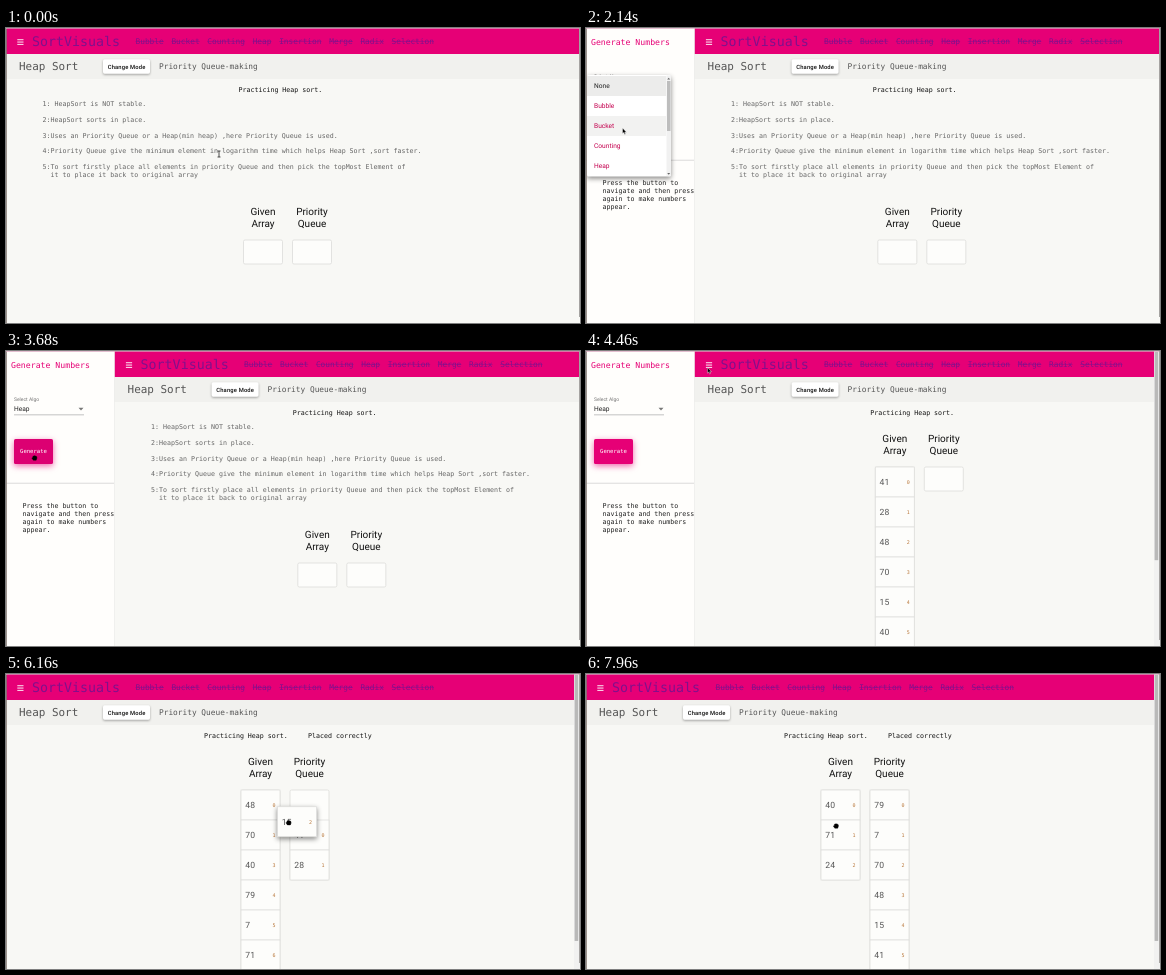
Animation, 574 px wide and 295 px high, one loop 8000 ms. Source, as an HTML page:

```html
<!DOCTYPE html>
<html lang="en">
<head>
<meta charset="utf-8">
<title>Sorting page</title>
<style>
html, body { margin: 0; width: 100%; height: 100%; overflow: hidden; background: #f8f8f5; }
svg { display: block; width: 100%; height: 100%; text-rendering: geometricPrecision; }
text { font-family: "DejaVu Sans Mono", monospace; white-space: pre; }
.r { font-family: Roboto, sans-serif; }
.m { font-weight: 500; letter-spacing: .0286em; }
.c { text-anchor: middle; }
.card { filter: drop-shadow(0 2px 2.5px #0007); }
.btn { filter: drop-shadow(0 1px 1px #0005); }
.glow { filter: drop-shadow(0 2px 3px #e6007699); }
</style>
</head>
<body>
<svg id="stage" viewBox="0 0 574 295" preserveAspectRatio="none"></svg>
<script>
const LOOP = 8000, PINK = '#e60076', PURPLE = '#80108c';
const NUMBERS = [41, 28, 48, 70, 15, 40, 79, 7, 71, 24];
const ALGOS = ['Bubble', 'Bucket', 'Counting', 'Heap', 'Insertion', 'Merge', 'Radix', 'Selection'];
const RULES = [
  '1: HeapSort is NOT stable.',
  '2:HeapSort sorts in place.',
  '3:Uses an Priority Queue or a Heap(min heap) ,here Priority Queue is used.',
  '4:Priority Queue give the minimum element in logarithm time which helps Heap Sort ,sort faster.',
  '5:To sort firstly place all elements in priority Queue and then pick the topMost Element of'
];
const HELP = ['Press the button to', 'navigate and then press', 'again to make numbers', 'appear.'];

// pointer path: time, x, y
const PATH = [
  [0, 213, 126], [390, 213, 126], [1180, 13, 17], [1480, 13, 17], [1860, 45, 58], [2020, 36, 80],
  [2140, 36.5, 100], [2320, 37, 115], [2900, 37, 115], [3640, 28.5, 107], [3740, 28.5, 107],
  [4520, 123, 15], [5080, 123, 15], [5170, 242, 123], [5260, 291, 125], [5330, 291, 125],
  [5520, 246, 130], [5760, 295, 158], [5800, 295, 158], [6000, 246, 192], [6240, 295, 134],
  [6420, 246, 132], [6640, 296, 134], [6780, 248, 138], [6940, 303, 151], [7000, 297, 140],
  [7220, 246, 192], [7440, 297, 136], [7620, 246, 160], [7840, 296, 134], [7960, 250, 152], [8000, 250, 152]
];
// drags: grab, drop, slot taken, slot filled, number on the moving card
const DRAGS = [
  [5170, 5330, 0, 0, 41], [5520, 5800, 0, 1, 28], [6000, 6240, 2, 0, 15], [6420, 6640, 0, 0, 48],
  [6780, 7000, 0, 0, 48], [7220, 7440, 2, 0, 7], [7620, 7840, 1, 0, 79]
];

const svg = document.getElementById('stage');
const clamp = v => Math.max(0, Math.min(1, v));
const ramp = (t, a, len) => clamp((t - a) / len);
const smooth = p => p * p * (3 - 2 * p);
const rect = (x, y, w, h, fill, more = '') =>
  `<rect x="${x}" y="${y}" width="${w}" height="${h}" fill="${fill}" ${more}/>`;
const text = (x, y, size, fill, str, cls = '', more = '') =>
  `<text x="${x}" y="${y}" font-size="${size}" fill="${fill}" class="${cls}" ${more}>${str}</text>`;
const shape = (d, fill, more = '') => `<path d="${d}" fill="${fill}" ${more}/>`;
const group = (x, y, body, more = '') => `<g transform="translate(${x} ${y})" ${more}>${body}</g>`;

function pointer(t) {
  const i = PATH.findIndex(p => p[0] > t), a = PATH[i - 1], b = PATH[i];
  const p = smooth(ramp(t, a[0], b[0] - a[0]));
  return [a[1] + (b[1] - a[1]) * p, a[2] + (b[2] - a[2]) * p];
}

function lists(t) {
  const given = [...NUMBERS], queue = [];
  for (const d of DRAGS) {
    if (t < d[0]) break;
    if (t < d[1]) return { given, queue, drag: d };
    queue.splice(d[3], 0, given.splice(d[2], 1)[0]);
  }
  return { given, queue };
}

const card = (x, y, value, index, cls = '') => group(x, y,
  rect(0, 0, 39, 30, '#fdfdfb', `stroke="#dededc" stroke-width=".8" class="${cls}"`) +
  text(4.3, 18.2, 8.6, '#555', value, 'r') + text(33, 17, 5, '#b9773a', index, 'c'));

const box = (x, y, h) => rect(x, y, 39, h, '#fdfdfb', 'rx="1.5" stroke="#dcdcda" stroke-width=".8"');

function columns(t, made, state, left, top) {
  const { given, queue, drag } = state, right = left + 49;
  const k = drag ? ramp(t, drag[0], 80) : 0, n = drag ? 1 : 0;
  const head = (x, a, b) => text(x, top - 24.7, 10, '#111', a, 'r c') + text(x, top - 12.7, 10, '#111', b, 'r c');
  let s = head(left + 19.5, 'Given', 'Array') + head(right + 19.5, 'Priority', 'Queue');
  s += box(left, top, made ? (given.length - n) * 30 : 24) + box(right, top, (queue.length + n) * 30 || 24);
  if (!made) return s;
  given.forEach((v, i) => {
    if (drag && i === drag[2]) return;
    s += card(left, top + 30 * (i - (drag && i > drag[2] ? k : 0)), v, i);
  });
  queue.forEach((v, i) => {
    if (drag && v === drag[4]) return;
    s += card(right, top + 30 * (i + (drag && i >= drag[3] ? k : 0)), v, i);
  });
  return s;
}

function header(width) {
  let s = rect(0, 0, width, 26, PINK) + rect(0, 26, width, 25, '#f1f1ee');
  for (const y of [11.3, 13.6, 15.9]) s += rect(11.3, y, 6.2, .9, '#fff');
  s += text(26, 18, 13.3, PURPLE, 'SortVisuals');
  let x = 129.5;
  for (const name of ALGOS) {
    const w = name.length * 4.71;
    s += text(x, 16.2, 7.82, PURPLE, name) + rect(x, 13.2, w, .8, PURPLE, 'opacity=".6"');
    x += w + 7.65;
  }
  return s + text(13, 42.3, 10.95, '#555', 'Heap Sort') +
    rect(97, 31.3, 47, 14.4, '#fff', 'rx="1.6" class="btn"') +
    text(120.6, 40.6, 5.8, '#111', 'Change Mode', 'r m c') +
    text(153, 41.2, 7.82, '#555', 'Priority Queue-making');
}

function drawer(t) {
  const open = t > 1880, picked = t > 2950;
  let s = rect(0, 0, 108.5, 295, '#fffefc') + rect(108, 0, .6, 295, '#ddd') +
    text(5, 16.8, 8.2, PINK, 'Generate Numbers');
  s += open ? text(8, 50, 5, '#777', 'Select Algo', 'r') : text(8, 60.3, 6.64, '#777', 'Select Algo', 'r');
  if (picked) s += text(8, 60.3, 6.64, '#222', 'Heap', 'r');
  s += shape('M72.5 56.8h5l-2.5 2.6z', '#777') + rect(8, 63.6, 70, .6, '#999');
  const hot = t > 3500 && t < 3900;
  s += rect(8, 88, 39, 25, hot ? '#dc0072' : PINK, 'rx="1.6" class="glow"') +
    text(27.5, 102.2, 5.6, '#fff', 'Generate', 'c') + rect(0, 131.8, 108, .7, '#ccc');
  HELP.forEach((line, i) => s += text(16.5, 157.3 + 7.85 * i, 6.63, '#222', line));
  return `<g clip-path="url(#side)">${s}</g>`;
}

function menu(t, y) {
  const alpha = ramp(t, 1890, 110) * (1 - ramp(t, 2950, 110));
  if (!alpha) return '';
  const scroll = 28 * ramp(t, 2610, 90), hover = Math.floor((y - 48 + scroll) / 20);
  let rows = '';
  ['None', ...ALGOS].forEach((name, i) => {
    const top = 48 + 20 * i - scroll;
    if (i === 0 || i === hover) rows += rect(1, top, 79.5, 20, i ? '#f2f2f1' : '#ececeb');
    rows += text(8, top + 12.3, 6.64, i ? '#c4004f' : '#222', name, 'r');
  });
  return `<g opacity="${alpha}">` + rect(1, 47, 84, 101.5, '#fff', 'rx="1.5" class="card"') +
    `<g clip-path="url(#list)">${rows}</g>` + rect(80.5, 47.5, 4.5, 100.5, '#f1f1f1') +
    rect(81, 53 + scroll / 2, 3.5, 50, '#bdbdbd') +
    shape('M81.2 51.5h3l-1.5-1.8zM81.2 145h3l-1.5 1.8z', '#666') + '</g>';
}

function cursor(t, [x, y]) {
  let s;
  if (t < 450) s = shape('M-1.5 -3h3M0 -3v6M-1.5 3h3', 'none', 'stroke="#222" stroke-width=".8"');
  else if (t > 5120 || (t > 3500 && t < 3850))
    s = shape('M-2.7 0L-1.6 -.4V-1.7Q0 -2.9 1.7 -1.7Q2.6 -1.6 2.4 .2L1.7 2.2H-1.2z', '#000', 'stroke="#000" stroke-width=".4"');
  else s = shape('M0 0V5.6L1.3 4.5L2.2 6.5L3.1 6.1L2.2 4.2H4z', '#000', 'stroke="#fff" stroke-width=".4"');
  return group(x, y, s);
}

function draw(t) {
  const made = t >= 3740, at = pointer(t), state = lists(t), { given, queue, drag } = state;
  const slots = drag ? Math.max(given.length - 1, queue.length + 1) : Math.max(given.length, queue.length);
  const height = 116 + 30 * slots, bar = made && height > 295;
  const out = 1 - (1 - ramp(t, 1250, 225)) ** 3, shut = smooth(ramp(t, 4590, 195));
  const d = 108.6 * (out - shut), mid = d / 2 - (bar ? 2.5 : 0);
  const placed = t >= DRAGS[0][1], titleX = (placed ? 200.5 : 232.5) + mid;

  let s = '<defs><clipPath id="side"><path d="M0 0h108.6v295H0z"/></clipPath>' +
    '<clipPath id="list"><path d="M1 48h79.5v100H1z"/></clipPath></defs>' + rect(0, 0, 574, 295, '#f8f8f5');
  s += text(titleX, 64, 6.63, '#111', 'Practicing Heap sort.');
  if (placed) s += text(titleX + 104, 64, 6.63, '#111', 'Placed correctly');
  if (!made) {
    RULES.forEach((line, i) => s += text(36.5 + d, 78.3 + 15.7 * i, 6.63, '#666', line));
    s += text(44.5 + d, 149, 6.63, '#666', 'it to place it back to original array');
  }
  s += columns(t, made, state, 237.5 + mid, made ? 116 : 212);
  s += group(d, 0, header(574 - d));
  if (d > 0) s += group(d - 108.6, 0, drawer(t));
  s += menu(t, at[1]);
  if (drag) {
    const from = pointer(drag[0]);
    s += card(235 + at[0] - from[0], 116 + 30 * drag[2] + at[1] - from[1], drag[4], drag[2] && 0 || drag[2], 'card');
  }
  if (bar) s += rect(568, 0, 6, 295, '#f1f1f0') + rect(568.6, 1, 3.6, 295 * 295 / height - 1, '#b9b9b8');
  s += rect(0, 0, .8, 295, '#857a74') + rect(0, 0, 574, .7, '#d9a5bd') + rect(573, 0, 1, 289, '#a5a3a1');
  svg.innerHTML = s + cursor(t, at);
}

function tick() {
  draw(performance.now() % LOOP);
  requestAnimationFrame(tick);
}
tick();
</script>
</body>
</html>
```
